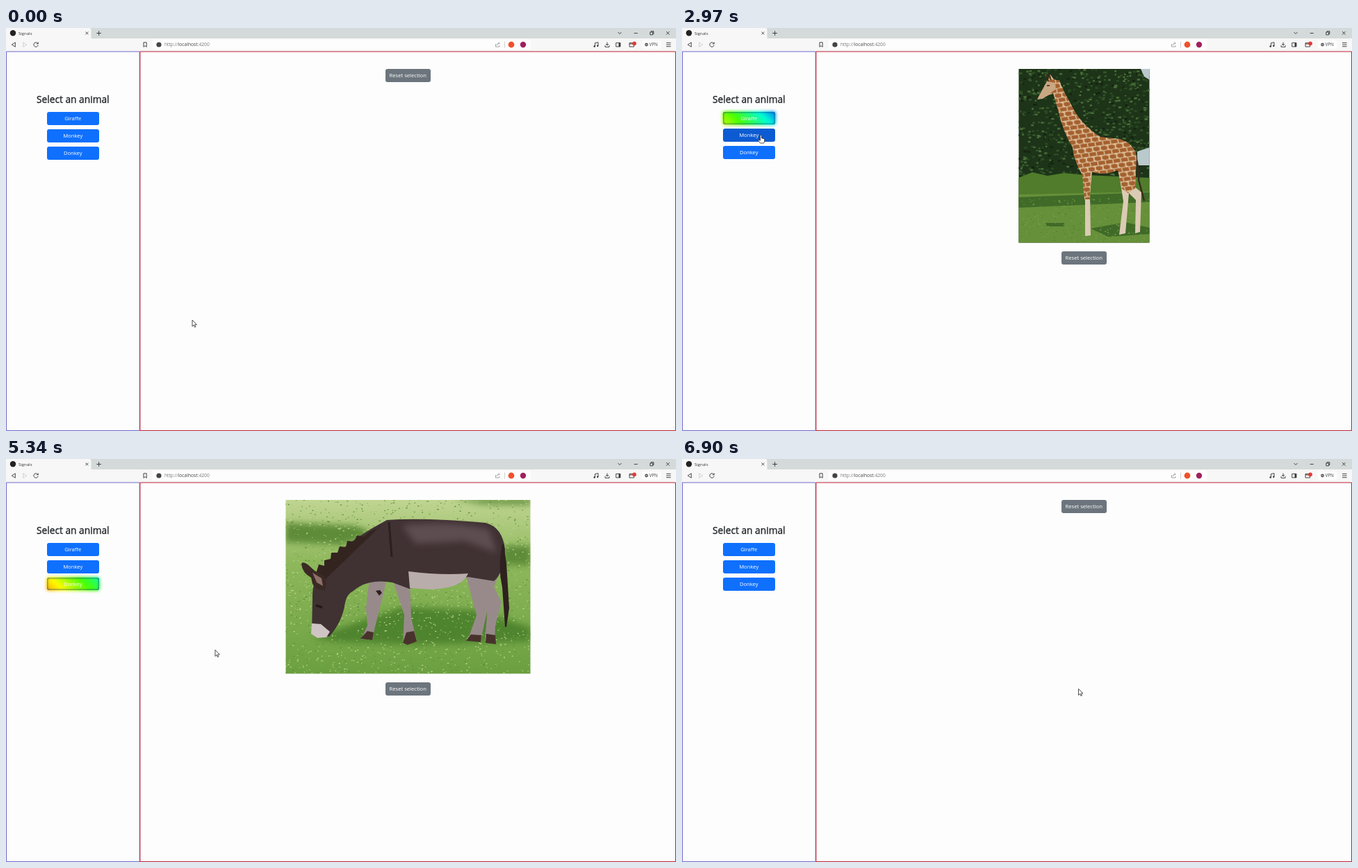
An HTML page that plays this animation: 964x581 px, repeating every 6930 ms.

```html
<!DOCTYPE html>
<html lang="en">
<head>
<meta charset="utf-8">
<title>Signals</title>
<style>
  html, body { margin: 0; width: 100%; height: 100%; overflow: hidden; background: #fdfdfd; }
  body, text { font-family: "Open Sans", "Noto Sans", sans-serif; }
  svg { position: absolute; left: 0; top: 0; }
  .btn { position: absolute; box-sizing: border-box; border-radius: 3px; color: #fff;
    font-size: 7.65px; text-align: center; white-space: nowrap; }
  .animal { left: 58.5px; width: 75.5px; }
  #reset { left: 545.5px; width: 65.5px; height: 19px; line-height: 19px; }
  .btn span { position: relative; }
  .glow { position: absolute; inset: -1px; border-radius: 4px; filter: blur(2px); background-size: 400%;
    background-image: linear-gradient(45deg, #ff0000, #ff7300, #fffb00, #48ff00, #00ffd5, #002bff, #7a00ff, #ff00c8, #ff0000); }
  .rim { position: absolute; inset: 0; border-radius: 3px; box-shadow: inset 0 0 3px #0009; }
</style>
</head>
<body>
<svg width="964" height="581" viewBox="0 0 964 581">
  <defs>
    <pattern id="coat" width="11" height="14" patternUnits="userSpaceOnUse" patternTransform="rotate(-8)">
      <path d="M0 0H11V14H0Z" fill="#dcbf98"/>
      <path d="M1 1L6 .5 10 2 9.5 6.5 4 7 .5 5ZM0 8L3.5 7.8 4 13.3H0ZM5 8L11 7.5V13L5.5 13.4Z" fill="#a5602f"/>
    </pattern>
    <linearGradient id="lawn" x2="0" y2="1">
      <stop stop-color="#c0d592"/><stop offset=".35" stop-color="#8fb85c"/><stop offset="1" stop-color="#6a9f40"/>
    </linearGradient>
    <filter id="soft"><feGaussianBlur stdDeviation="5"/></filter>
    <clipPath id="monkeyFrame"><path d="M504.5 59H652.5V309.5H504.5Z"/></clipPath>
    <clipPath id="giraffeFrame"><path d="M484.5 59H672.5V309.5H484.5Z"/></clipPath>
    <clipPath id="donkeyFrame"><path d="M402.5 59H754.5V309.5H402.5Z"/></clipPath>
  </defs>

  <!-- browser bars -->
  <path d="M0 0H964V15H0Z" fill="#d4dad9"/>
  <path d="M0 0H120q2.5 0 2.5 3V15H964V34H0Z" fill="#f6f7f6"/>
  <rect x="211" y="17" width="544" height="14" rx="2" fill="#fdfdfd"/>
  <circle cx="10" cy="7.3" r="4.2" fill="#222"/>
  <circle cx="220" cy="24" r="3.6" fill="#444"/>
  <circle cx="727" cy="24" r="4.4" fill="#f0512b"/>
  <circle cx="744" cy="24" r="4.2" fill="#a0205c"/>
  <g fill="none" stroke="#333" stroke-width=".9">
    <path d="M114.500 5.500l3.800 3.800m0-3.800l-3.800 3.800M130.300 7.500h6.600m-3.300-3.300v6.600M880.500 6l2.500 2.500 2.500-2.500M903.700 7.500h5M950 5l4.600 4.600m0-4.600l-4.600 4.600"/>
    <path d="M926.800 6h3.800v3.800h-3.800ZM928 6V4.700h3.800v3.800h-1.200"/>
    <path d="M13.300 20.800V27.200L8.300 24Z"/>
    <path d="M24.700 20.800V27.200L29.700 24Z" stroke="#ccc"/>
    <path d="M45.800 22.300a3.200 3.200 0 1 0 .4 2.400M46.300 20.500v2.300h-2.300"/>
    <path d="M198 20.800h4.200v6.500l-2.100-1.700-2.100 1.700Z"/>
    <path d="M704.500 23v4h5.500v-2M706 25q.3-3.200 4-3.200m-1.500-1.500l1.700 1.500-1.700 1.500" stroke="#999"/>
    <path d="M717.500 19.500v9" stroke="#ccc"/>
    <path d="M847.500 26.500v-5l4.500-.8v5"/>
    <path d="M865 20.500v4.500m-2-2l2 2 2-2M862 25v2.300h6V25"/>
    <path d="M877.700 21.300h6.200v5.600h-6.200Z"/>
    <path d="M897 21.500h6.500v5.500H897ZM897 23h6"/>
    <path d="M950 21.300h6.500m-6.500 2.700h6.500m-6.500 2.700h6.500"/>
  </g>
  <path d="M881.500 21.300h2.400v5.600h-2.400Z" fill="#333"/>
  <g fill="#333"><circle cx="846.700" cy="26.500" r="1.200"/><circle cx="851.200" cy="25.700" r="1.200"/></g>
  <circle cx="904" cy="22.300" r="2.900" fill="#e33b36"/>
  <rect x="914.500" y="18" width="28" height="12" rx="3" fill="#fdfdfd"/>
  <circle cx="921.500" cy="24" r="2.400" fill="#555"/>
  <path d="M920 24h3" stroke="#fff" stroke-width=".7"/>
  <text x="18" y="9.500" font-size="6" fill="#333">Signals</text>
  <text x="228" y="26.300" font-size="6.700" fill="#777">http://<tspan fill="#444">localhost</tspan>:4200</text>
  <text x="925.500" y="26.300" font-size="6.300" fill="#444">VPN</text>

  <!-- page panels -->
  <g fill="none">
    <path d="M.5 34H192.200V580.500H.5Z" stroke="#7068cc"/>
    <path d="M192.900 34H963.500V580.500H192.900Z" stroke="#bc2036"/>
  </g>
  <text x="96.300" y="108" font-size="13.750" text-anchor="middle" fill="#212529" stroke="#212529" stroke-width=".35">Select an animal</text>

  <!-- pictures -->
  <g class="photo" clip-path="url(#giraffeFrame)">
    <path d="M484 59H673V310H484Z" fill="#1d3419"/>
    <g id="leaves"></g>
    <path d="M660 59h13v16l-8-5ZM655 178l18-6v26h-18Z" fill="#b9c9cc"/>
    <path d="M484 216l20-8 22 5 24-4 30 3 93 4V245H484Z" fill="#507c2b"/>
    <path d="M484 240l189-4V310H484Z" fill="#66903a"/>
    <path d="M484 244l189-7v14l-189 8ZM588 289l50-9 35 8v9l-60 4ZM523 281h27v5h-25Z" fill="#3f6a28"/>
    <g id="turf"></g>
    <path d="M653 185q5 20 4 34l8 30" fill="none" stroke="#3a2a20" stroke-width="2.500"/>
    <path d="M576 205L580 250 580 300 588 299 587 240 590 205ZM628 205L635 250 629 298 638 296 643 238 653 248 652 296 659 294 661 237 650 228V200Z" fill="#dccbb4"/>
    <path d="M511 103L525 77 530 67 535 74 543 76 549 90 566 122Q580 143 602 157L630 160Q650 166 654 185L652 231 642 238 633 232 627 205Q606 214 588 207L587 247H579L576 212Q563 190 562 172 548 150 541 118L534 94 519 101Z" fill="url(#coat)"/>
    <path d="M511 103L525 77 537 79 538 88 519 102Z" fill="#c9a783"/>
    <path d="M527 77l-2-9 3-1 3 8M525 83h4" stroke="#3a2418" stroke-width="1.500" fill="none"/>
  </g>

  <g class="photo" clip-path="url(#monkeyFrame)">
    <path d="M504 59H653V310H504Z" fill="#cdd0aa"/>
    <g id="bokeh" filter="url(#soft)"></g>
    <g fill="none" stroke-linecap="round">
      <path d="M504 217q30 8 55 15M504 295q30-5 30-22M504 155l20 10M510 245l18 50" stroke="#b9a88b" stroke-width="4"/>
      <path d="M565 240Q600 246 607 315" stroke="#a99a7c" stroke-width="17"/>
      <path d="M552 225Q555 275 527 312" stroke="#8b7659" stroke-width="10"/>
    </g>
    <path d="M553 310q18-9 36 0ZM622 310l14-14 17-3v17Z" fill="#3b302a"/>
    <path d="M570 108Q535 118 528 155 518 200 539 230L558 236 575 205 612 180Q622 138 605 116Z" fill="#a38d6d"/>
    <path d="M570 128Q588 124 602 135L594 164 570 160Z" fill="#d3cab8"/>
    <path d="M531 164q-12 50 18 70l17 6 12-34-8-34Z" fill="#7b6245"/>
    <path d="M612 168q8 4 4 22l-20 36-15-2 9-34Z" fill="#9a8464"/>
    <path d="M561 194l22-2-2 46-14 3Z" fill="#a48b6c"/>
    <path d="M530 152q15-7 40-2l14 10 4 24-8 14-9-6-2-22-37 2Z" fill="#72583f"/>
    <path d="M573 226l20-10 6 9-13 6 22 9-3 9-33-3-8-9Z" fill="#665044"/>
    <ellipse cx="588" cy="91" rx="25" ry="28" fill="#94785a"/>
    <ellipse cx="588" cy="96" rx="18" ry="21" fill="#c69478"/>
    <path d="M571 78q4-16 18-15 16 0 20 13-10-6-18 0-10-6-20 2Z" fill="#3a2d28"/>
    <path d="M580 111q8-5 17 0" stroke="#875846" stroke-width="1.500" fill="none"/>
    <g fill="#3b251b"><circle cx="582" cy="86" r="2.600"/><circle cx="596" cy="86" r="2.600"/></g>
  </g>

  <g class="photo" clip-path="url(#donkeyFrame)">
    <path d="M402 59H755V310H402Z" fill="url(#lawn)"/>
    <g filter="url(#soft)">
      <path d="M402 92l100 4 30 12-50 16-80-4ZM640 57h115v9l-70-1ZM715 125h40v28h-40Z" fill="#5d8b39"/>
      <path d="M440 258l130-45 110 5 75 25v20l-160 5-120-4Z" fill="#50842f"/>
    </g>
    <g id="grass"></g>
    <path d="M523 172L547 178 531 242 527 260 511 260 520 240 518 215ZM557 176L581 178 583 228 591 263 571 267 573 225ZM660 162L716 150 702 184 713 207 704 240 703 264 689 262 693 215 684 258 664 262 677 225Z" fill="#988a8b"/>
    <path d="M520 248l9 2-2 11-17-2ZM576 250l11-2 4 15-13 5-7-3ZM669 253l15 1-1 10-21-2ZM691 252l13 2 1 13-15-2Z" fill="#48322c"/>
    <path d="M452 160Q490 118 548 88 600 84 690 92 714 98 718 130 716 165 702 176L665 170 580 187 556 178Q520 172 500 190 490 195 488 207 484 235 465 256L440 250 441 200Q440 178 452 160Z" fill="#403133"/>
    <path d="M570 96Q640 88 695 102L706 135 660 118 590 122Z" fill="#5d4e51" filter="url(#soft)"/>
    <path d="M446 165l4-13 8 2 0-8 9-2 1-9 9 0 3-9 9 1 2-9 10 1 4-9 10 2 8-7 14-6 5-6-20 20-62 60Z" fill="#33241f"/>
    <path d="M579 162Q625 168 665 165 656 187 610 188L581 186Z" fill="#b9adab"/>
    <path d="M425 151q2-4 9 1l10 9 13 7q6 9 2 21-12 2-18-9l-2-9q-13-7-14-20Z" fill="#3b2925"/>
    <path d="M441 164l13 8 2 11-9-5Z" fill="#8d7066"/>
    <path d="M440 237l13 1 13 11-5 8-13 1-9-6Z" fill="#cfc4c4"/>
    <path d="M446 211l9 3" stroke="#211815" stroke-width="3"/>
    <path d="M532 190l6-1 3 4-4 4Z" fill="#2e201e"/>
    <path d="M551 91l4 50" stroke="#2c1f1e" stroke-width="3"/>
    <path d="M715 123Q708 155 715 185L719 242 723 215 719 150Z" fill="#2e211f" stroke="#2e211f" stroke-width="2"/>
  </g>
</svg>

<div class="btn animal"><div class="glow"></div><div class="rim"></div><span>Giraffe</span></div>
<div class="btn animal"><div class="glow"></div><div class="rim"></div><span>Monkey</span></div>
<div class="btn animal"><div class="glow"></div><div class="rim"></div><span>Donkey</span></div>
<div class="btn" id="reset">Reset selection</div>

<svg width="964" height="581" viewBox="0 0 964 581">
  <g id="cursor" fill="#fff" stroke="#222" stroke-width=".8" stroke-linejoin="round">
    <path id="arrow" d="M0 0V9.200L2.100 7.200 3.500 10.300 5 9.700 3.600 6.700H6.400Z"/>
    <path id="hand" d="M-1 1a1 1 0 0 1 2 0V4.300l3.300.8q1 .3 1 1.400V8.500L4.200 11.500H-.8L-3.800 7.800Q-4 6.300-2.600 6.700L-1 7.800Z"/>
  </g>
</svg>

<script>
const LOOP = 6930;
const $ = id => document.getElementById(id);
const animals = [...document.querySelectorAll('.animal')];
const photos = [...document.querySelectorAll('.photo')];

// [time, chosen animal]
const clicks = [[0, -1], [1960, 0], [3430, 1], [4720, 2], [6745, -1]];
// [enter, leave] for the three animals and the reset button
const hovers = [[1270, 2703], [2765, 4040], [4110, 5040], [5746, 6745]];

const smooth = u => u * u * (3 - 2 * u);
const easeIn = u => u * u;
const easeOut = u => u * (2 - u);
// [time, x, y, easing towards this point]
const route = [
  [60, 268, 421], [1430, 113.5, 128, smooth],
  [2550, 113.5, 128, smooth], [2900, 113.5, 154.5, smooth],
  [3850, 113.5, 154.5, smooth], [4300, 113.5, 180.5, smooth],
  [4900, 113.5, 180.5, smooth], [5340, 300, 275, easeIn],
  [5900, 566.5, 331.5, easeOut], [6740, 566.5, 331.5, smooth], [6880, 570.5, 331.3, smooth],
];

const clamp = u => Math.max(0, Math.min(1, u));

function pointer(t) {
  const next = route.findIndex(p => p[0] > t);
  if (next <= 0) return route.at(next).slice(1, 3);
  const [t0, x0, y0] = route[next - 1], [t1, x1, y1, ease] = route[next];
  const u = ease((t - t0) / (t1 - t0));
  return [x0 + (x1 - x0) * u, y0 + (y1 - y0) * u];
}

let seed = 7;
const random = () => (seed = seed * 16807 % 2147483647) / 2147483647;

// Fills a box with round dabs, one path per colour.
function scatter(id, [x, y, w, h], colours, count, size) {
  $(id).innerHTML = colours.map(colour => {
    let d = '';
    for (let i = 0; i < count; i++)
      d += `M${(x + random() * w).toFixed(1)} ${(y + random() * h).toFixed(1)}h${(size * random()).toFixed(1)}`;
    return `<path d="${d}" stroke="${colour}" stroke-width="${size}" stroke-linecap="round"/>`;
  }).join('');
}
scatter('leaves', [484, 59, 188, 155], ['#14240f', '#35572a', '#2a4a22', '#496d38'], 190, 2.6);
scatter('turf', [484, 246, 188, 64], ['#769f46', '#588432'], 130, 1.4);
scatter('bokeh', [504, 59, 148, 250], ['#a9b574', '#ecefdf', '#d9de9f', '#b8ad91'], 16, 20);
scatter('grass', [402, 59, 352, 250], ['#a5c774', '#5c9136', '#b9d488', '#77a84c'], 500, 1.4);

function mix(from, to, u) {
  return `rgb(${from.map((c, i) => Math.round(c + (to[i] - c) * u))})`;
}

function render(t) {
  const [since, chosen] = clicks.findLast(c => c[0] <= t);
  const hover = hovers.map(([enter, leave]) => clamp((t - enter) / 150) - clamp((t - leave) / 150));

  animals.forEach((button, i) => {
    const active = i === chosen;
    const [glow, rim] = button.children;
    button.style.top = 121 + 25 * i - (chosen >= 0 && chosen < i ? 1 : 0) + 'px';
    button.style.height = button.style.lineHeight = (active ? 18 : 19) + 'px';
    button.style.background = mix([15, 112, 253], [13, 91, 210], hover[i]);
    glow.style.display = rim.style.display = photos[i].style.display = active ? '' : 'none';
    glow.style.backgroundPosition = (t - since) * 0.04 + '% 0';
  });

  const reset = $('reset').style;
  reset.top = chosen < 0 ? '59px' : '321.5px';
  reset.background = mix([108, 117, 125], [92, 99, 106], hover[3]);

  const pointing = hovers.some(([enter, leave]) => t >= enter && t < leave);
  $('hand').style.display = pointing ? '' : 'none';
  $('arrow').style.display = pointing ? 'none' : '';
  $('cursor').setAttribute('transform', `translate(${pointer(t)})`);
}

const start = performance.now();
function tick() {
  render((performance.now() - start) % LOOP);
  requestAnimationFrame(tick);
}
tick();
</script>
</body>
</html>
```
